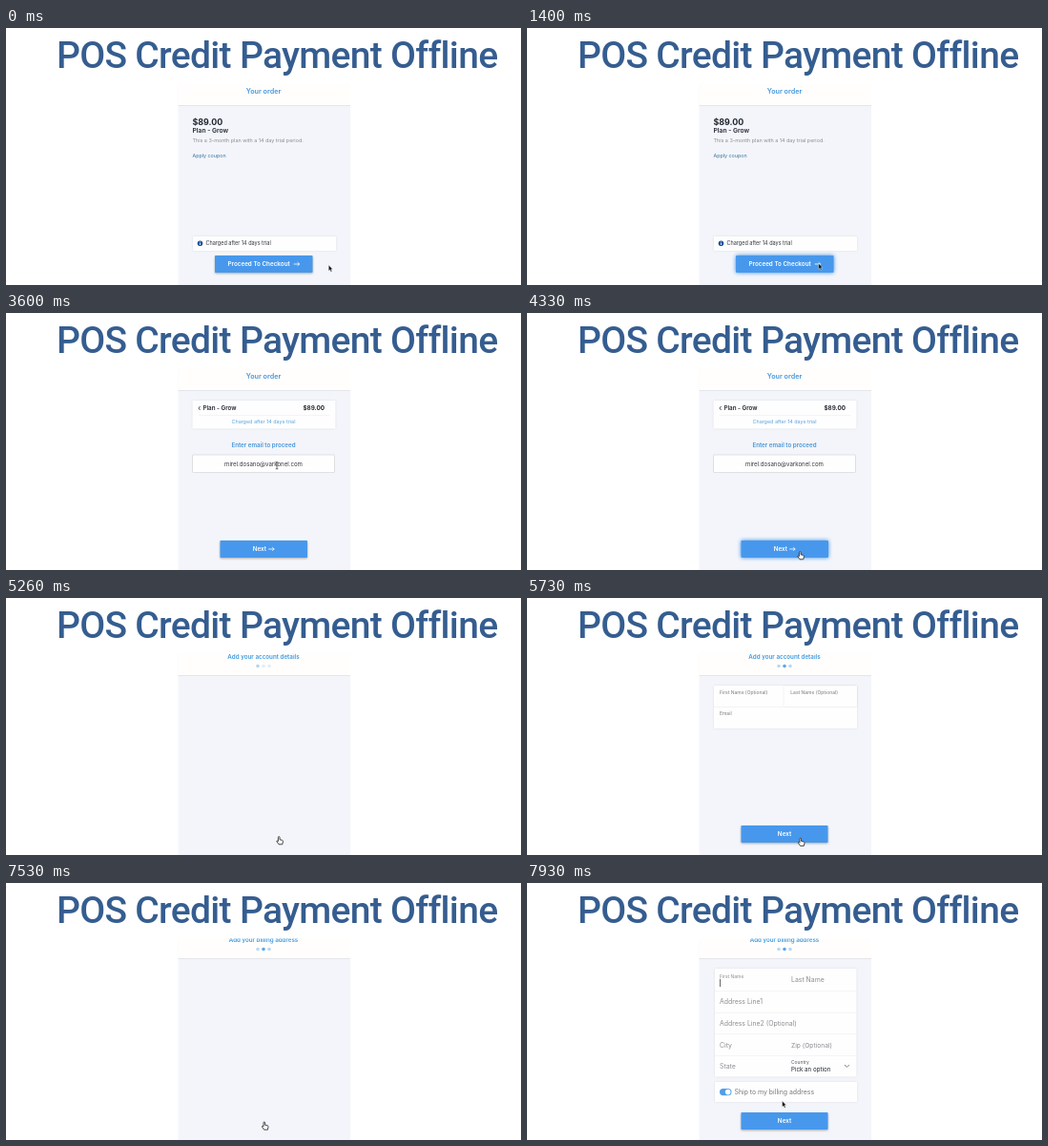
These frames come from a looping animation (540x270 px, 8 s). An HTML page:

```html
<!DOCTYPE html>
<html lang="en">
<head>
<meta charset="utf-8">
<title>POS Credit Payment Offline</title>
<style>
html, body { margin: 0; width: 100%; height: 100%; overflow: hidden; background: #fff; }
svg { display: block; width: 540px; height: 270px; }
text { font-family: Inter, "Open Sans", sans-serif; }
.main { font: 500 39px Roboto, sans-serif; letter-spacing: -.7px; fill: #355d90; }
.card { filter: drop-shadow(0 .5px 1.2px #00000018); }
.raised { filter: drop-shadow(0 1px .8px #00000050); }
.glow { filter: drop-shadow(0 0 2px #3088e8); }
</style>
</head>
<body>
<svg viewBox="0 0 540 270" id="stage"></svg>
<script>
const BLUE = '#4798ec', INK = '#222630', GREY = '#8b8d92', LINE = '#eeeef0';

const text = (x, y, size, str, fill = GREY, weight = 400, anchor = 'start') =>
  `<text x="${x}" y="${y}" font-size="${size}" fill="${fill}" font-weight="${weight}" text-anchor="${anchor}">${str}</text>`;
const mid = (y, size, str, fill, weight) => text(270, y, size, str, fill, weight, 'middle');
const rect = (x, y, w, h, fill = '#fefefe', extra = '') =>
  `<rect x="${x}" y="${y}" width="${w}" height="${h}" fill="${fill}" ${extra}/>`;
const card = (x, y, w, h) => rect(x, y, w, h, '#fefefe', 'class="card" rx="1"');
const path = (d, stroke, width = .8, extra = '') =>
  `<path d="${d}" fill="none" stroke="${stroke}" stroke-width="${width}" ${extra}/>`;
const group = (id, body, extra = '') => `<g id="${id}" ${extra}>${body}</g>`;
const arrow = (x, y) => path(`M${x} ${y}h6m-2 -1.7l2 1.7l-2 1.7`, '#fff', .8);
const button = (id, x, y, w) => rect(x, y, w, 18, BLUE, `id="${id}" class="raised" rx=".8"`);
const spinner = id => group(id, path('M-1.5 -5.3A5.5 5.5 0 0 0 -2 5.1M1.5 5.3A5.5 5.5 0 0 0 3.2 -4.5', '#fff', 1));
const dots = (id, y) => group(id, [264, 270, 276].map(x => `<circle cx="${x}" cy="${y}" r="1.8"/>`).join(''), 'fill="#54a4ea"');

const order = text(195.5, 102, 8.9, '$89.00', INK, 700)
  + text(195.5, 110.3, 6.7, 'Plan - Grow', INK, 600)
  + text(195.5, 120, 5.4, 'This a 3-month plan with a 14 day trial period.')
  + text(195.5, 136.3, 5.35, 'Apply coupon', '#39749f')
  + card(196, 219, 150, 15)
  + '<circle cx="203.5" cy="226.3" r="2.8" fill="#1f569c"/>'
  + path('M203.5 224.6v.9m0 .5v2', '#fff', .8)
  + text(209.5, 228.2, 5.5, 'Charged after 14 days trial', '#34373d')
  + button('payButton', 219, 239, 102.5)
  + text(232.5, 250.1, 6.3, 'Proceed To Checkout', '#fff', 600) + arrow(301.7, 248);

const email = card(195.5, 92, 150, 29.5) + rect(202, 107.3, 137, .6, LINE)
  + path('M203.6 98l-1.7 2l1.7 2', INK)
  + text(206.4, 102.2, 6.25, 'Plan - Grow', INK, 600)
  + text(334, 102.2, 6.3, '$89.00', INK, 700, 'end')
  + mid(116, 5.4, 'Charged after 14 days trial', '#5ca3df')
  + mid(141.2, 6.2, 'Enter email to proceed', '#4795d8', 600)
  + rect(195.5, 149, 149, 18.5, '#fefefe', 'stroke="#d9dadd" stroke-width=".8" rx=".5"')
  + group('hint', mid(160.5, 6.2, 'Email address', '#77797e'))
  + group('typed', mid(160.6, 6.1, 'mirel.dosano@varkonel.com', '#33353a'))
  + button('emailButton', 224.5, 239, 91.5)
  + group('emailLabel', text(258.7, 250.1, 6.3, 'Next', '#fff', 600) + arrow(275.2, 248))
  + spinner('emailSpin');

const account = card(196, 92, 150, 45)
  + rect(269.5, 92.5, 76.5, 21.5, '#fefefe', 'class="card"')
  + rect(196, 114, 150, .6, LINE)
  + text(202, 100.6, 4.95, 'First Name (Optional)', GREY, 500)
  + text(276.3, 100.6, 4.95, 'Last Name (Optional)', GREY, 500)
  + text(202, 123.3, 4.95, 'Email', GREY, 500)
  + button('accountButton', 224.5, 239, 91)
  + group('accountLabel', mid(250.1, 6.3, 'Next', '#fff', 600))
  + spinner('accountSpin');

const billing = card(197, 90, 148.5, 113.5)
  + [113, 136, 158.5, 181].map(y => rect(197, y, 148.5, .6, LINE)).join('')
  + text(202, 99.7, 4.95, 'First Name') + rect(202, 100.8, .8, 8.2, '#444')
  + text(277, 104.2, 6.9, 'Last Name')
  + text(202, 127, 6.9, 'Address Line1')
  + text(202, 149.8, 6.9, 'Address Line2 (Optional)')
  + text(202, 172.5, 6.9, 'City') + text(277, 172.5, 6.7, 'Zip (Optional)')
  + text(202, 195.2, 6.9, 'State')
  + text(277, 189.8, 4.95, 'Country', '#55575c') + text(277, 198, 6.2, 'Pick an option', INK)
  + path('M333 191l2.4 2.5l2.4 -2.5', '#777', .9)
  + card(197, 209, 149, 21)
  + rect(202, 216, 12.5, 7.2, '#4f9fe8', 'rx="3.6"') + '<circle cx="210.7" cy="219.6" r="2.8" fill="#fff"/>'
  + text(217.5, 222.4, 6.9, 'Ship to my billing address', '#77797e')
  + button('billingButton', 224.5, 241, 91)
  + mid(252.2, 6.3, 'Next', '#fff', 600);

const OUTLINE = 'stroke-linejoin="round"';
stage.innerHTML = '<clipPath id="panel"><rect x="180" y="58.5" width="181" height="212"/></clipPath>'
  + '<text class="main" x="53" y="42">POS Credit Payment Offline</text>'
  + '<g clip-path="url(#panel)">'
  + rect(180.5, 60, 180.5, 210, '#f3f5fa')
  + group('header', rect(180.5, 55, 180.5, 26.5, '#fffefc') + rect(180.5, 81, 180.5, .9, '#e2e4e8'))
  + group('orderTitle', mid(69.4, 7.2, 'Your order', '#4797dd', 600))
  + group('accountTitle', mid(64, 6.25, 'Add your account details', '#3f9adf', 600))
  + group('billingTitle', mid(64, 6.2, 'Add your billing address', '#3f9adf', 600))
  + dots('steps', 71.5)
  + group('order', order) + group('email', email) + group('account', account) + group('billing', billing)
  + '</g>'
  + group('cursor',
    `<path id="pointer" d="M0 0V6.2L1.4 5 2.4 7.3 3.5 6.8 2.5 4.6H4.3Z" fill="#111" stroke="#fff" stroke-width=".4" ${OUTLINE}/>`
    + `<path id="hand" d="M-.8 .6Q-.8 -.2 0 -.2T.8 .6V3L3.4 3.6Q4.4 3.9 4.2 5L3.6 8H-.2L-2.4 4.8Q-2.4 4 -1.4 4.2L-.8 4.8Z" fill="#fff" stroke="#333" stroke-width=".9" ${OUTLINE}/>`
    + path('M-1.3 -3.5h2.6M0 -3.5v7M-1.3 3.5h2.6', '#333', .7, 'id="beam"'));

const $ = id => document.getElementById(id);
const fade = (id, v) => $(id).setAttribute('opacity', v);
const move = (id, x, y, turn = 0) => $(id).setAttribute('transform', `translate(${x} ${y}) rotate(${turn})`);
const glow = (id, on) => $(id).setAttribute('class', on ? 'glow' : 'raised');

// Cursor stops: time, x, y
const stops = [
  [533, 338.3, 249], [1000, 305.7, 247.2], [2600, 306, 247.5], [3133, 284, 157], [3533, 284, 157],
  [4133, 286.2, 250.8], [5600, 286.2, 250.8], [6067, 289, 259], [6333, 289, 259],
  [6533, 270.8, 251.2], [7733, 270.8, 251.2], [7933, 267.6, 229]
];
function cursorAt(t) {
  const i = stops.findIndex(s => s[0] > t);
  if (i < 0) return stops[stops.length - 1].slice(1);
  if (!i) return stops[0].slice(1);
  const [a, b] = [stops[i - 1], stops[i]];
  const p = (t - a[0]) / (b[0] - a[0]), e = p * p * (3 - 2 * p);
  return [1, 2].map(k => a[k] + (b[k] - a[k]) * e);
}

function draw(t) {
  const ramp = (a, b) => Math.min(1, Math.max(0, (t - a) / (b - a)));
  const within = (a, b) => +(t >= a && t < b);

  fade('order', within(0, 1440));
  glow('payButton', t > 1390);

  fade('email', within(0, 4920) * ramp(1733, 2333));
  fade('hint', within(0, 3590));
  fade('typed', within(3590, 8000));
  fade('emailLabel', within(0, 4390));
  fade('emailSpin', within(4390, 5000));
  move('emailSpin', 270, 248, t * .36);
  glow('emailButton', t > 4320);

  fade('account', ramp(5290, 5600) * (1 - ramp(6800, 7133)));
  fade('accountLabel', within(0, 5790));
  fade('accountSpin', within(5790, 8000));
  move('accountSpin', 270, 248, Math.min(0, t - 6133) * .36);

  fade('billing', ramp(7733, 7933));

  const lift = -(within(7320, 8000) + within(7520, 8000));
  fade('orderTitle', 1 - ramp(4867, 5000));
  fade('accountTitle', ramp(4933, 5133) * (1 - ramp(6800, 7000)));
  fade('billingTitle', ramp(6933, 7133));
  move('billingTitle', 0, lift);
  move('steps', 0, lift);
  move('header', 0, t > 7520 ? -2 : 0);
  const shown = ramp(4933, 5133), grown = ramp(5267, 5600);
  [.45, .18, .18].forEach((v, i) =>
    $('steps').children[i].setAttribute('opacity', shown * (v + ([.42, .95, .42][i] - v) * grown)));

  const onField = within(3000, 3660);
  const onButton = within(1790, 2800) || within(3930, 5790) || within(6460, 7790);
  fade('beam', onField);
  fade('hand', onButton);
  fade('pointer', 1 - onField - onButton);
  move('cursor', ...cursorAt(t));
}

const start = performance.now(), TICK = 200 / 3;
function loop() {
  const t = (performance.now() - start) % 8000;
  draw(Math.min(119, Math.floor((t + 7) / TICK)) * TICK);
  requestAnimationFrame(loop);
}
loop();
</script>
</body>
</html>
```
